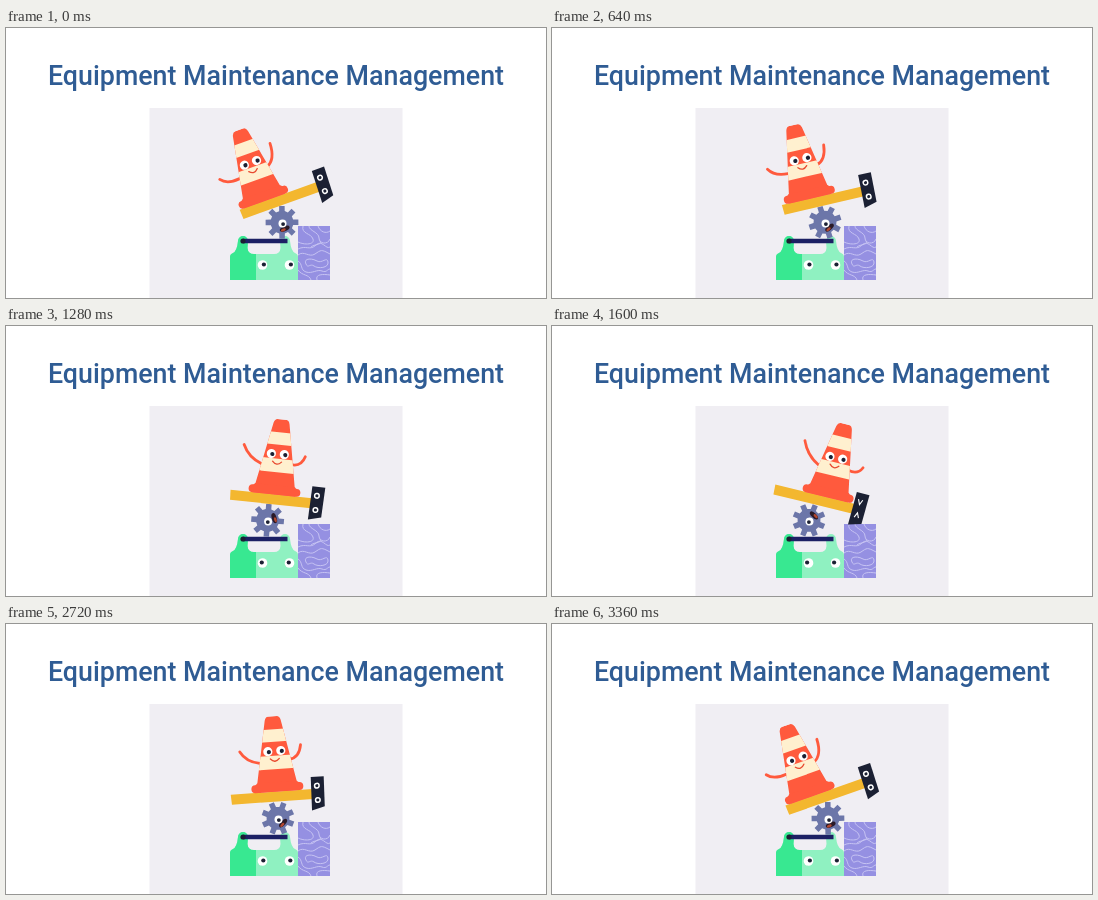
These frames come from a looping animation (540 px wide and 270 px high, 3400 ms). An HTML page:

```html
<!DOCTYPE html>
<html lang="en">
<head>
<meta charset="utf-8">
<title>Equipment Maintenance Management</title>
<style>
html, body { margin: 0; width: 100%; height: 100%; overflow: hidden; background: #fff; }
svg { display: block; width: 540px; height: 270px; }
text { font: 500 26.8px Roboto, sans-serif; fill: #2f5c94; text-anchor: middle; }
.ink { fill: #1b2033; }
.arm { fill: none; stroke: #ff5a3d; stroke-width: 2.8; stroke-linecap: round; }
</style>
</head>
<body>
<svg viewBox="0 0 540 270">
  <defs>
    <path id="box" d="M224 252V229Q224 226 227 225Q231 223 232 213A5 5 0 0 1 242 213L241.500 220Q242 226 248 226H268Q274 226 274.500 220L274 213A5 5 0 0 1 284 213Q285 223 289 225Q292 226 292 229V252Z"/>
    <clipPath id="leftHalf"><rect x="220" y="200" width="30" height="60"/></clipPath>
    <clipPath id="blockClip"><rect x="292" y="198" width="32" height="54"/></clipPath>
    <clipPath id="coneClip"><path d="M-21.500 3.500L-8-68Q-7-72 -4-72H4Q7-72 8-68L21.500 3.500Z"/></clipPath>
  </defs>
  <text x="270" y="56.500">Equipment Maintenance Management</text>
  <rect x="143.500" y="80" width="253" height="190" fill="#f0eef3"/>

  <g clip-path="url(#blockClip)">
    <rect x="292" y="198" width="32" height="54" fill="#9590e2"/>
    <g fill="none" stroke="#c6c3f3" stroke-width="1">
      <path d="M297 198C295 206 305 205 307 211S298 217 292 214M303 198C303 203 313 204 313 210S322 217 324 211M312 198C314 204 320 206 324 203"/>
      <path d="M292 221C300 217 304 223 310 217S320 222 324 219M292 227C298 222 303 230 309 226S315 221 324 226"/>
      <path d="M300 236C297 230 306 230 311 233S321 228 322 234S312 241 308 238S302 241 300 236ZM292 233C297 236 294 242 300 244S311 241 316 243S321 241 324 241"/>
      <path d="M292 242C296 248 303 246 305 252M311 252C309 246 317 246 324 247M314 213C317 217 308 216 305 219"/>
    </g>
  </g>

  <use href="#box" fill="#8ff1c1"/>
  <use href="#box" fill="#38e891" clip-path="url(#leftHalf)"/>
  <path d="M237 213H281.500" stroke="#1c2064" stroke-width="4.500"/>
  <circle class="ink" cx="237" cy="213" r="2.600"/>
  <g fill="#fff"><circle cx="256.500" cy="237" r="4.800"/><circle cx="283.500" cy="237" r="4.800"/></g>
  <g id="boxPupils" class="ink"><circle cx="256.500" cy="236.500" r="2.100"/><circle cx="283.500" cy="236.500" r="2.100"/></g>

  <g id="gear">
    <g id="wheel">
      <path id="teeth" fill="#6c76a9"/>
      <ellipse cx="7" rx="2.400" ry="5.200" fill="#2a1a28"/>
      <ellipse cx="7.600" cy="1.800" rx="1.300" ry="2.600" fill="#b4472f"/>
    </g>
    <circle cx=".5" cy="1.300" r="4" fill="#fff"/>
    <circle id="gearPupil" class="ink" cy="1.800" r="1.900"/>
  </g>

  <g id="hammer">
    <path d="M-40-5H42V5H-39.500Z" fill="#f3b72f"/>
    <path d="M41-17H54L53 13L40 16.500Z" fill="#1b2033"/>
    <g id="open" fill="#1b2033" stroke="#fff" stroke-width="1.500">
      <circle cx="46.500" cy="-8" r="2.300"/><circle cx="46.500" cy="6.300" r="2.300"/>
    </g>
    <path id="shut" d="M44.300-10.500L46.500-5.500L48.700-10.500M44.300 8L46.500 3L48.700 8" fill="none" stroke="#fff" stroke-width="1.100"/>
    <g id="cone">
      <path id="armL" class="arm"/>
      <path id="armR" class="arm"/>
      <g clip-path="url(#coneClip)">
        <rect x="-25" y="-73" width="50" height="78" fill="#ff5a3d"/>
        <path d="M-25-59H25V-46.500H-25ZM-25-32.500H25V-19H-25Z" fill="#fff0cf"/>
      </g>
      <path d="M-20-6Q-21-4.500 -22-4.500A4 4 0 0 0 -22 3.500H22A4 4 0 0 0 22-4.500Q21-4.500 20-6Z" fill="#ff5a3d"/>
      <g fill="#fff"><circle cx="-7" cy="-37" r="4.600"/><circle cx="6" cy="-37.300" r="4.600"/></g>
      <g class="ink"><circle cx="-6" cy="-36.600" r="2.100"/><circle cx="7" cy="-36.900" r="2.100"/></g>
      <path d="M-5-29.500Q-.5-24.500 4-29.500" fill="none" stroke="#e8492f" stroke-width="1.300" stroke-linecap="round"/>
    </g>
  </g>
</svg>
<script>
const LOOP = 3400, STEP = 40;
const $ = id => document.getElementById(id);
const set = (id, name, value) => $(id).setAttribute(name, value);

// time, hammer tilt, hammer x, gear x, cone offset along the handle
const keys = [
  [0, -19.8, 273, 276, -13.5],
  [640, -13, 270, 273, -11],
  [960, -3, 267, 267, -6],
  [1600, 13.7, 261, 257, 13.4],
  [1850, 14.2, 260.5, 256.6, 16],
  [2240, 9, 261.2, 261, 15.7],
  [2720, -4, 265, 272, 7]
];

function key(i, col) {
  const n = keys.length, turn = Math.floor(i / n), k = keys[i - turn * n];
  return col ? k[col] : k[0] + turn * LOOP;
}

// Periodic cubic Hermite curve through the keys
function track(t, col) {
  let i = keys.length - 1;
  while (key(i, 0) > t) i--;
  const slope = j => (key(j + 1, col) - key(j - 1, col)) / (key(j + 1, 0) - key(j - 1, 0));
  const span = key(i + 1, 0) - key(i, 0), u = (t - key(i, 0)) / span, v = 1 - u;
  return v * v * (1 + 2 * u) * key(i, col) + u * u * (1 + 2 * v) * key(i + 1, col)
    + span * u * v * (v * slope(i) - u * slope(i + 1));
}

function gearPath() {
  const points = [];
  for (let n = 0; n < 8; n++) {
    for (const [r, deg] of [[11.5, -14], [16.6, -9.5], [16.6, 9.5], [11.5, 14]]) {
      const a = (n * 45 + 22.5 + deg) * Math.PI / 180;
      points.push(`${r * Math.cos(a)} ${r * Math.sin(a)}`);
    }
  }
  return `M${points.join("L")}Z`;
}

function draw(now) {
  const t = Math.floor(now % LOOP / STEP) * STEP;
  const [tilt, x, gearX, slide] = [1, 2, 3, 4].map(col => track(t, col));
  const look = (gearX - 266.5) / 9.5;

  set("hammer", "transform", `translate(${x} 172.900) rotate(${tilt})`);
  set("cone", "transform", `translate(${slide} -8.300)`);
  set("gear", "transform", `translate(${gearX} 194.300)`);
  set("wheel", "transform", `rotate(${(gearX - 257) * 5.9 - 45})`);
  set("gearPupil", "cx", 0.5 + look * 0.6);
  set("boxPupils", "transform", `translate(${look * 1.4} 0)`);
  set("armL", "d", `M-16-26Q-29.5 ${-29.5 - 0.25 * tilt} -35 ${-40.5 - 0.43 * tilt}`);
  set("armR", "d", `M14-28Q24 ${-28 + 0.2 * tilt} ${26.5 + 0.1 * tilt} ${-40 + 0.45 * tilt}`);

  const squint = t >= 1480 && t < 1960;
  set("open", "visibility", squint ? "hidden" : "visible");
  set("shut", "visibility", squint ? "visible" : "hidden");
  requestAnimationFrame(tick);
}

const start = performance.now();
const tick = () => draw(performance.now() - start);
set("teeth", "d", gearPath());
tick();
</script>
</body>
</html>
```
